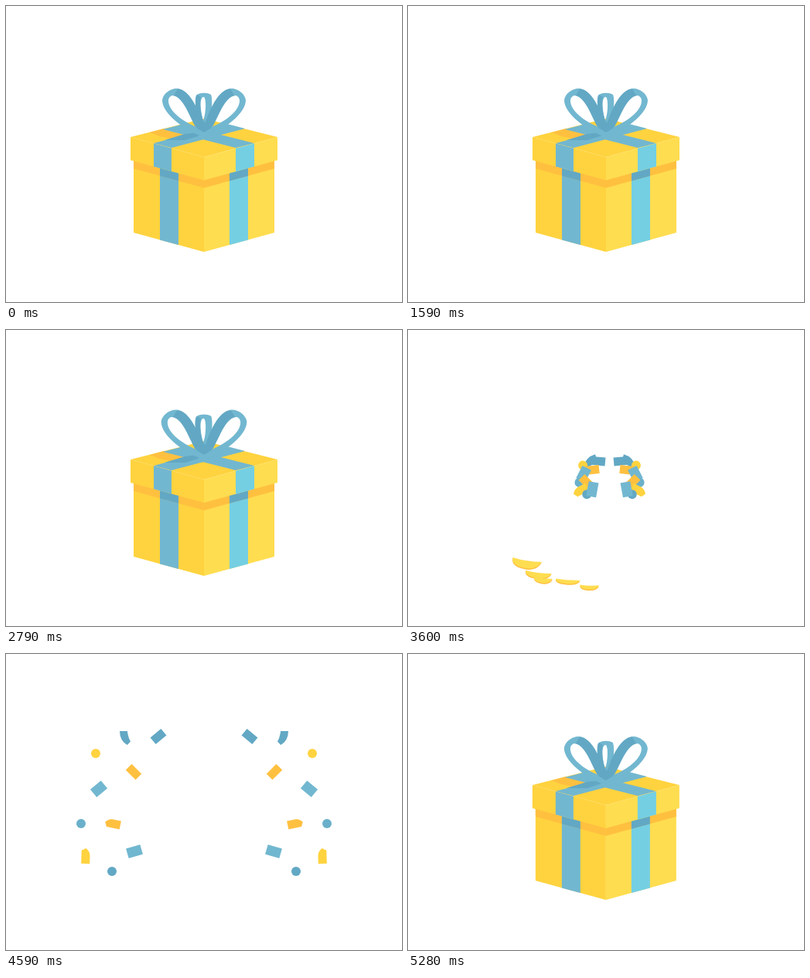
Animation, 512 px wide and 384 px high, one loop 5310 ms. Source, as an HTML page with a canvas:

```html
<!DOCTYPE html>
<html lang="en">
<head>
<meta charset="utf-8">
<title>Gift box</title>
<style>
  html, body { margin: 0; width: 100%; height: 100%; overflow: hidden; background: #fff; }
  canvas { display: block; width: 512px; height: 384px; }
</style>
</head>
<body>
<canvas id="stage" width="512" height="384"></canvas>
<script>
const ctx = document.getElementById('stage').getContext('2d');
const LOOP = 5310, HOP = 1590, BURST = 3570, RETURN = 4640;
const GOLD = '#ffd33f', LEMON = '#ffdd50', ORANGE = '#ffc040';
const BLUE = '#72b7d0', SKY = '#74cfe3', SLATE = '#62a8c4';

const clamp = v => Math.max(0, Math.min(1, v));
const smooth = v => v * v * (3 - 2 * v);

// Keyframes are [time, value] pairs, eased between neighbours.
function track(keys, t) {
  const i = keys.findIndex(k => k[0] > t);
  if (i < 0) return keys[keys.length - 1][1];
  if (i === 0) return keys[0][1];
  const [t0, a] = keys[i - 1], [t1, b] = keys[i];
  return a + (b - a) * smooth((t - t0) / (t1 - t0));
}

const hop = {
  lid: [[60, 0], [330, 22], [570, -42], [650, -64], [720, -60], [880, 4], [950, 18],
        [1080, -10], [1140, -6], [1200, -2], [1350, 1], [1560, 0]],
  lift: [[450, 0], [650, -36], [720, -32], [870, 0]],
  bow: [[60, 1], [330, .86], [600, 1.16], [720, 1.16], [930, .9], [1100, 1.04], [1350, 1]]
};
const finale = {
  lid: [[60, 0], [270, 28], [380, -90]],
  lift: [[270, 0], [380, -30]],
  bow: [[60, 1], [270, .86], [380, 1.2]]
};
const still = { lid: [[0, 0]], lift: [[0, 0]], bow: [[0, 1]] };

function poly(color, ...p) {
  ctx.fillStyle = color;
  ctx.beginPath();
  for (let i = 0; i < p.length; i += 2) ctx.lineTo(p[i], p[i + 1]);
  ctx.closePath();
  ctx.fill();
}

// Slanted strip of a front face; both faces fall towards x = 256.
function strip(color, x0, x1, top, bottom) {
  const drop = x => -Math.abs(x - 256) * .2735;
  poly(color, x0, top + drop(x0), x1, top + drop(x1), x1, bottom + drop(x1), x0, bottom + drop(x0));
}

function drawBody(lid, lift) {
  const top = 222 + lid, shade = 236 + lid, bottom = 319 + lift;
  strip(GOLD, 165, 256, top, bottom);
  strip(LEMON, 256, 347, top, bottom);
  strip(BLUE, 199, 223, top, bottom);
  strip(SKY, 289, 313, top, bottom);
  strip(ORANGE, 165, 256, top, shade);
  strip(ORANGE, 256, 347, top, shade);
  strip(SLATE, 199, 223, top, shade);
  strip(SLATE, 289, 313, top, shade);
}

function drawLid() {
  poly(GOLD, 161, 170, 256, 146, 351, 170, 256, 196);
  poly(ORANGE, 186, 164, 204, 159, 231, 166, 213, 172, 198, 169);
  poly(BLUE, 191, 178, 286, 153, 309, 159, 214, 184);
  poly(BLUE, 321, 178, 297, 184, 203, 160, 226, 154);
  poly(SLATE, 231, 166, 256, 163, 248, 169, 232, 174, 205, 174);
  strip(GOLD, 161, 256, 196, 226);
  strip(LEMON, 256, 351, 196, 226);
  strip(BLUE, 191, 214, 196, 226);
  strip(SKY, 297, 321, 196, 226);
}

const loopBand = new Path2D('M222 107C214 106 203 113 202 122C202 140 232 162 256 170L256 160C236 155 209 138 210 122C211 117 214 116 217 116Z');
const loopBack = new Path2D('M222 107C238 109 249 134 257 160L250 164C238 150 232 118 215 116Z');
const midLoop = new Path2D('M256 163C246 150 242 118 247 115C252 112 260 112 265 115C268 122 266 150 256 163ZM255 149C259 138 259 121 256 118C251 117 250 130 255 149Z');
const midBack = new Path2D('M247 115C242 120 247 150 256 163L256 150C251 140 250 124 252 118Z');

function fill(path, color) {
  ctx.fillStyle = color;
  ctx.fill(path, 'evenodd');
}

function drawBow(scale) {
  ctx.save();
  ctx.translate(256, 165);
  ctx.scale(scale, scale);
  ctx.translate(-256, -165);
  fill(midLoop, BLUE);
  fill(midBack, SLATE);
  for (const side of [1, -1]) {
    ctx.save();
    if (side < 0) { ctx.translate(512, 0); ctx.scale(-1, 1); }
    fill(loopBack, SLATE);
    fill(loopBand, BLUE);
    ctx.restore();
  }
  poly(SLATE, 246, 158, 256, 150, 266, 158, 256, 164);
  ctx.restore();
}

function drawGift(pose, t, dx) {
  const lid = track(pose.lid, t), lift = track(pose.lift, t);
  ctx.save();
  ctx.translate(dx, 0);
  drawBody(lid, lift);
  ctx.translate(0, lid);
  drawLid();
  drawBow(track(pose.bow, t));
  ctx.restore();
}

// Three accents above the bow: inner end, outer end.
const accents = [[243, 39, 228, 14], [256, 39, 256, 8], [266, 46, 284, 15]];

function drawAccents(t) {
  const head = smooth(clamp((t - 530) / 130)), tail = clamp((t - 600) / 240);
  if (head <= tail) return;
  ctx.strokeStyle = ORANGE;
  ctx.lineWidth = 7;
  ctx.lineCap = 'round';
  for (const [x0, y0, x1, y1] of accents) {
    const at = k => [x0 + (x1 - x0) * k, y0 + (y1 - y0) * k];
    ctx.beginPath();
    ctx.moveTo(...at(tail));
    ctx.lineTo(...at(head));
    ctx.stroke();
  }
}

// Swoosh around the base: lead angle, depth, length, thickness.
const streaks = [[0, 21, 38, 10], [.171, 37, 34, 7], [.233, 44, 24, 6], [.52, 39, 32, 5], [.744, 44, 25, 5]];

function drawSwoosh(t) {
  for (const [lead, depth, len, thick] of streaks) {
    const angle = lead + t * .0105;
    if (angle <= 0 || angle >= Math.PI) continue;
    const dx = -130 * Math.cos(angle);
    const grow = 1 + .3 * clamp((angle - 1.4) / 1.2);
    const size = Math.min(1, Math.sin(angle) * 1.8);
    ctx.save();
    ctx.translate(256 + dx, 290 + depth * grow * Math.sin(angle));
    ctx.rotate(-dx * .0015);
    ctx.scale(size, size);
    for (const [color, y] of [[ORANGE, 1.5], [LEMON, 0]]) {
      ctx.fillStyle = color;
      ctx.beginPath();
      ctx.moveTo(-len / 2, y - thick / 2);
      ctx.quadraticCurveTo(0, y - thick * .2, len / 2, y - thick / 2);
      ctx.quadraticCurveTo(len * .35, y + thick * .8, -len * .1, y + thick * .6);
      ctx.quadraticCurveTo(-len / 2, y + thick * .5, -len / 2, y - thick / 2);
      ctx.fill();
    }
    ctx.restore();
  }
}

// Left half of the confetti: x, y, kind, colour, degrees, width, height.
const confetti = [
  [197, 107, 'rect', SLATE, -40, 18, 11],
  [154, 109, 'wedge', SLATE, 0, 14, 18],
  [116, 129, 'dot', GOLD, 0, 12, 12],
  [165, 153, 'rect', ORANGE, 45, 18, 11],
  [120, 175, 'rect', BLUE, -40, 18, 13],
  [97, 220, 'dot', '#6ab0cb', 0, 12, 12],
  [138, 220, 'chip', ORANGE, 12, 20, 11],
  [103, 262, 'chip', GOLD, 92, 20, 11],
  [137, 282, 'dot', SLATE, 0, 12, 12],
  [166, 256, 'rect', BLUE, -16, 19, 13]
];

function drawPiece(kind, color, w, h) {
  ctx.fillStyle = color;
  ctx.beginPath();
  if (kind === 'dot') ctx.arc(0, 0, w / 2, 0, 7);
  else if (kind === 'rect') ctx.rect(-w / 2, -h / 2, w, h);
  else if (kind === 'wedge') {
    ctx.moveTo(-w / 2, -h / 2);
    ctx.lineTo(w * .2, -h / 2);
    ctx.quadraticCurveTo(w * .3, 0, w / 2, h * .25);
    ctx.lineTo(w * .2, h / 2);
    ctx.quadraticCurveTo(-w / 2, h * .2, -w / 2, -h / 2);
  } else {
    ctx.moveTo(-w / 2, 0);
    ctx.quadraticCurveTo(-w * .3, -h / 2, 0, -h / 2);
    ctx.lineTo(w / 2, -h / 2);
    ctx.lineTo(w / 2, h / 2);
    ctx.lineTo(-w * .35, h / 2);
  }
  ctx.fill();
}

function drawConfetti(t) {
  const spread = 1 - Math.exp(-t / 110);
  const fall = 10 * ((t / 1020) ** 2 - 1);
  const size = 1 - smooth(clamp((t - 1040) / 240));
  if (size <= 0) return;
  for (const side of [1, -1]) {
    confetti.forEach(([x, y, kind, color, deg, w, h], i) => {
      const spin = (1 - spread) * (60 + i * 37);
      ctx.save();
      ctx.translate(262 + (256 + side * (x - 256) - 262) * spread, 194 + (y + fall - 194) * spread);
      ctx.scale(side * size, size);
      ctx.rotate((deg + spin) * Math.PI / 180);
      drawPiece(kind, color, w, h);
      ctx.restore();
    });
  }
}

function draw(t) {
  ctx.fillStyle = '#fff';
  ctx.fillRect(0, 0, 512, 384);
  if (t < HOP * 2) {
    const local = t % HOP;
    drawAccents(local);
    drawGift(hop, local, 0);
    drawSwoosh(local - 895);
  } else {
    if (t < BURST) drawGift(finale, t - HOP * 2, 0);
    drawSwoosh(t - 3538);
    if (t >= BURST) drawConfetti(t - BURST);
    if (t >= RETURN) {
      const left = 1 - clamp((t - RETURN) / 660);
      drawGift(still, 0, -360 * left ** 2.2);
    }
  }
}

const start = performance.now();
function tick() {
  draw((performance.now() - start) % LOOP);
  requestAnimationFrame(tick);
}
tick();
</script>
</body>
</html>
```
